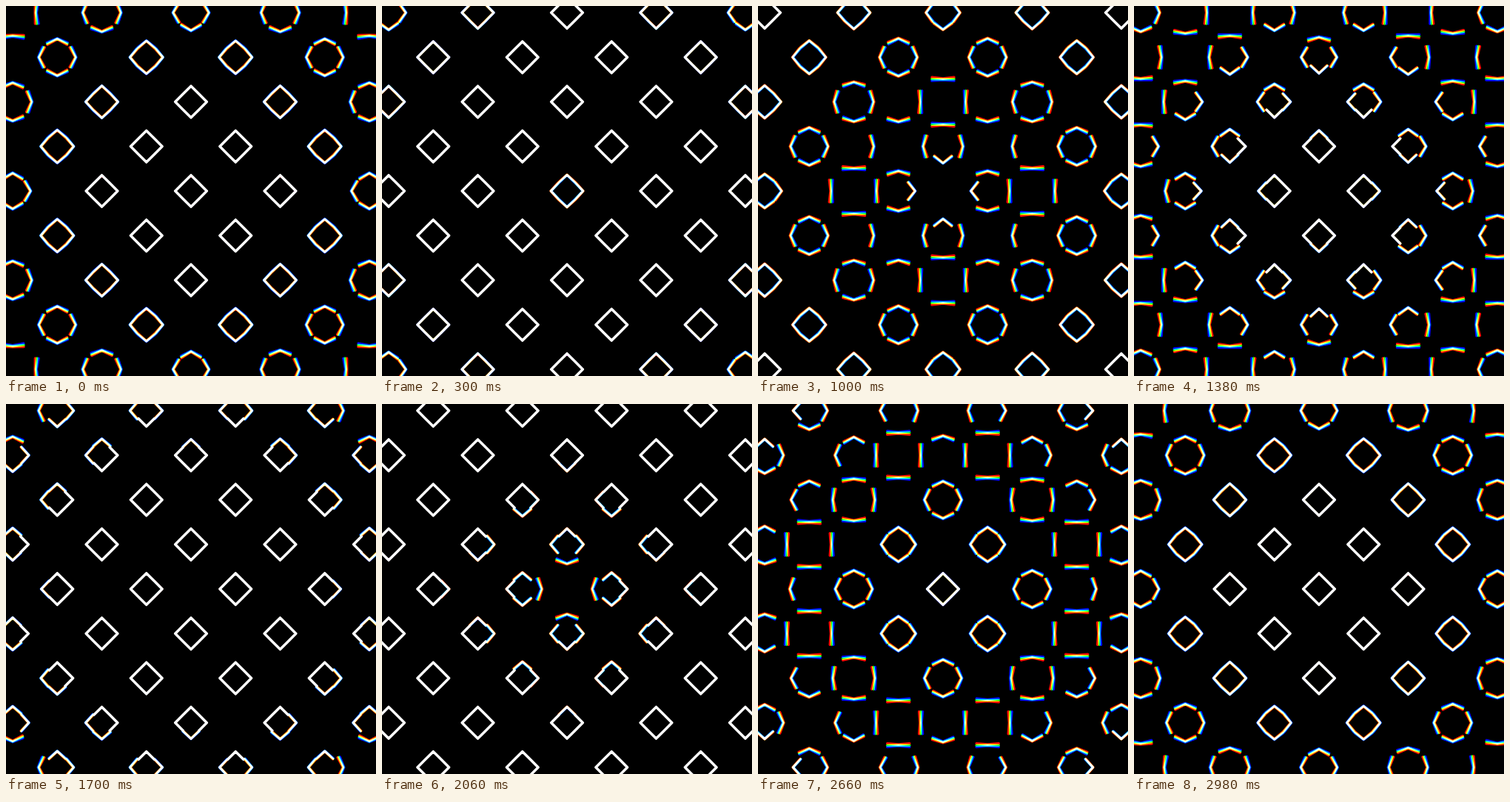
An HTML page with a canvas that plays this animation: 500x500 px, repeating every 3 s.

```html
<!DOCTYPE html>
<html lang="en">
<head>
<meta charset="utf-8">
<title>Folding lattice</title>
<style>
  html, body { margin: 0; width: 100%; height: 100%; overflow: hidden; background: #000; }
  canvas { display: block; width: 500px; height: 500px; }
</style>
</head>
<body>
<canvas id="stage" width="500" height="500"></canvas>
<script>
const ctx = document.getElementById('stage').getContext('2d');

const LOOP = 3000;
const HALF = LOOP / 2;
const FOLD = 1000;       // length of one fold
const START = 195;       // when the middle cell begins to open
const DELAY = 148.5;     // wave delay per cell of distance
const LAG = 30;          // time between colour layers
const CELL = 60.25;
const ARM = CELL / 4;
const TIP = CELL / 2 * Math.SQRT1_2;   // tip distance of a closed diamond
const REACH = 5;

const layers = [['#f00', LAG], ['#0f0', 0], ['#00f', -LAG]];

const cells = [];
for (let i = -REACH; i <= REACH; i++) {
  for (let j = -REACH; j <= REACH; j++) {
    if ((i + j) % 2 === 0) {
      cells.push({ x: 250 + i * CELL, y: 250 + j * CELL, wait: START + DELAY * Math.hypot(i, j) });
    }
  }
}

function ease(p) {
  const u = Math.min(1, Math.max(0, p));
  return u < 0.5 ? 2 * u * u : 1 - 2 * (1 - u) * (1 - u);
}

// 1 = closed around its own cell, -1 = folded over to the neighbours
function bend(t) {
  const local = ((t % LOOP) + LOOP) % LOOP;
  return local < HALF
    ? 1 - 2 * ease(local / FOLD)
    : 2 * ease((local - HALF) / FOLD) - 1;
}

function addCell({ x, y, wait }, t) {
  const b = bend(t - wait);
  const angle = b * Math.PI / 4;
  const tip = CELL / 2 - b * (CELL / 2 - TIP);
  const end = tip - ARM * Math.sin(angle);
  const side = ARM * Math.cos(angle);
  for (const [c, s] of [[1, 0], [0, 1], [-1, 0], [0, -1]]) {
    const at = (out, across) => [x + c * out - s * across, y + s * out + c * across];
    ctx.moveTo(...at(end, -side));
    ctx.lineTo(...at(tip, 0));
    ctx.lineTo(...at(end, side));
  }
}

function draw(t) {
  ctx.globalCompositeOperation = 'source-over';
  ctx.fillStyle = '#000';
  ctx.fillRect(0, 0, 500, 500);
  ctx.globalCompositeOperation = 'lighter';
  ctx.lineWidth = 3.5;
  ctx.lineCap = ctx.lineJoin = 'round';
  for (const [color, shift] of layers) {
    ctx.beginPath();
    for (const cell of cells) addCell(cell, t + shift);
    ctx.strokeStyle = color;
    ctx.stroke();
  }
}

const begin = performance.now();
function tick() {
  draw((performance.now() - begin) % LOOP);
  requestAnimationFrame(tick);
}
tick();
</script>
</body>
</html>
```
